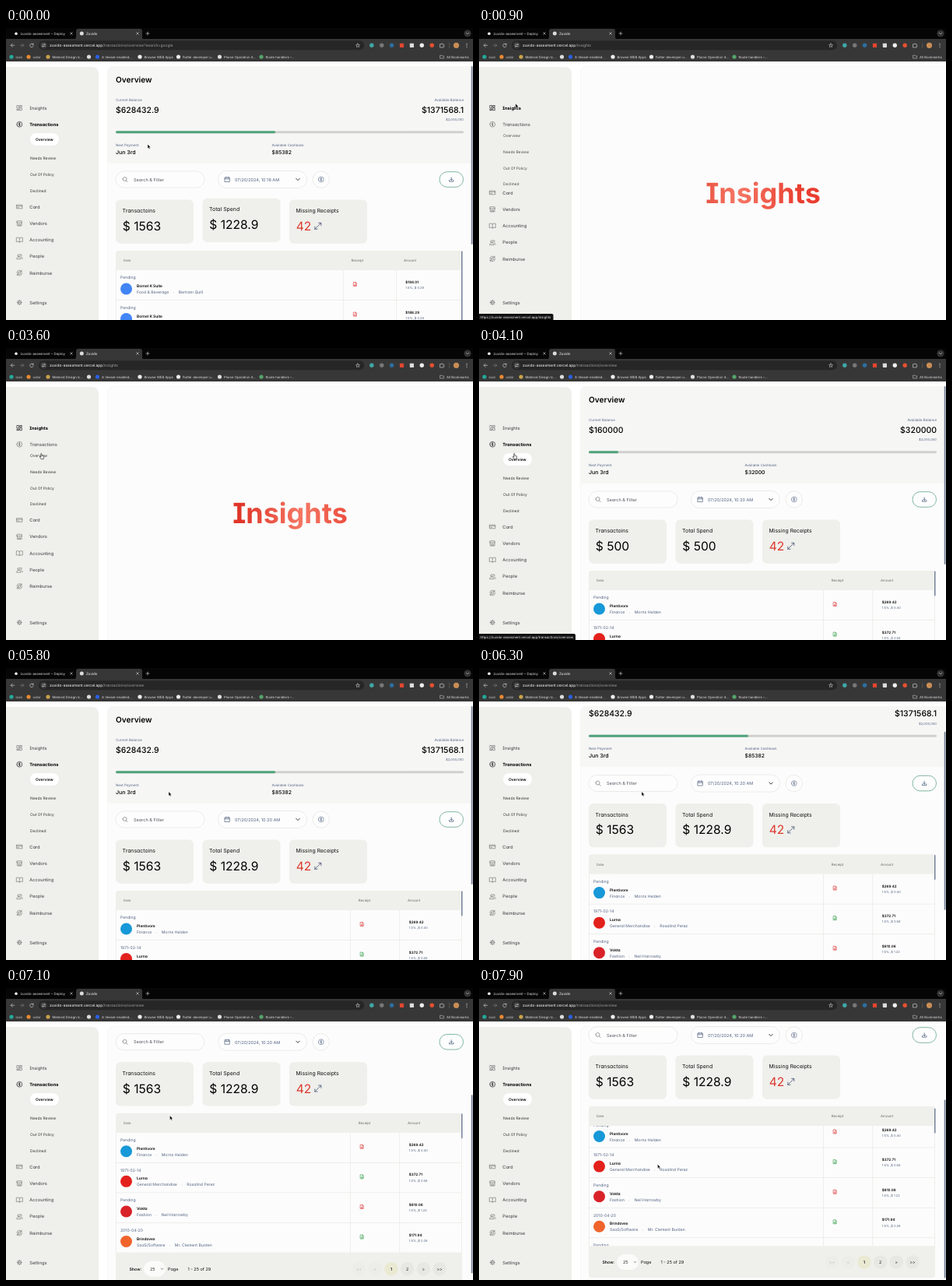
Recreate the animation shown at these times as an HTML page. Size 600 by 375 pixels, loop 8000 ms.

```html
<!DOCTYPE html>
<html lang="en">
<head>
<meta charset="utf-8">
<title>Overview</title>
<style>
  html, body { margin: 0; width: 100%; height: 100%; overflow: hidden; background: #fff; }
  svg { display: block; width: 100vw; height: 100vh; font-family: Inter, sans-serif; text-rendering: geometricPrecision; }
  .page { font-feature-settings: "cv08", "cv11"; }
</style>
</head>
<body>
<svg id="stage" viewBox="0 0 600 375"></svg>
<script>
const LOOP = 8000;
const OPEN_INSIGHTS = 850, OPEN_OVERVIEW = 3950;
const HOST = 'zuvido-assesment.vercel.app';
const INK = '#111', SLATE = '#536482', SAND = '#efefeb', LINE = '#e4e4e0';

const mix = (a, b, p) => a + (b - a) * p;
const progress = (t, from, to) => {
  const p = Math.min(1, Math.max(0, (t - from) / (to - from)));
  return p * p * (3 - 2 * p);
};
// keys: [time, value, value...]
function track(t, keys) {
  let i = 0;
  while (i < keys.length - 2 && t >= keys[i + 1][0]) i++;
  const [a, b] = [keys[i], keys[i + 1]];
  const p = progress(t, a[0], b[0]);
  return a.slice(1).map((v, k) => mix(v, b[k + 1], p));
}

// Text is placed by the middle of its capitals.
const text = (x, y, size, str, fill = INK, weight = 400, anchor = 'start') =>
  `<text x="${x}" y="${y + size * 0.36}" font-size="${size}" fill="${fill}" font-weight="${weight}" text-anchor="${anchor}">${str}</text>`;
const box = (x, y, w, h, fill, r = 0, stroke = 'none', sw = 0.6) =>
  `<rect x="${x}" y="${y}" width="${w}" height="${h}" rx="${r}" fill="${fill}" stroke="${stroke}" stroke-width="${sw}"/>`;
const dot = (x, y, r, fill, stroke = 'none', sw = 0.6) =>
  `<circle cx="${x}" cy="${y}" r="${r}" fill="${fill}" stroke="${stroke}" stroke-width="${sw}"/>`;
const icon = (x, y, d, stroke, sw = 0.6, fill = 'none') =>
  `<path transform="translate(${x} ${y})" d="${d}" fill="${fill}" stroke="${stroke}" stroke-width="${sw}" stroke-linecap="round" stroke-linejoin="round"/>`;
const group = (inner, dy = 0, extra = '') => `<g transform="translate(0 ${dy})" ${extra}>${inner}</g>`;

const COIN = 'M-3.4 0a3.4 3.4 0 1 0 6.8 0a3.4 3.4 0 1 0-6.8 0M1-1C.6-1.8-1-1.7-1-.8S1 0 1 .8S-.7 1.7-1 1M0-2v4';
const CROSS = 'M-1.3-1.3l2.6 2.6M1.3-1.3l-2.6 2.6';
const CHEVRON = 'M-1.8-.9L0 .9L1.8-.9';
const FOLDER = 'M-2.3-1.8h1.8l.7.7h2.1v3h-4.6z';
const MENU = {
  Insights: 'M-3-3h2.3v3.4H-3zM.8-3H3v1.8H.8zM-3 1.8h2.3V3.2H-3zM.8.2H3v3H.8z',
  Transactions: COIN,
  Card: 'M-3.5-2.3h7v4.6h-7zM-3.5-.8h7M-2.3 1h1.4',
  Vendors: 'M-2.8-3h5.6l.5 2.2h-6.6zM-2.8-.8v4h5.6v-4M-1 3.2V1h2v2.2',
  Accounting: 'M0-2.2C-1-3-2.5-3-4-2.7v5.2c1.5-.3 3-.2 4 .5c1-.7 2.5-.8 4-.5v-5.2C2.5-3 1-3 0-2.2v5.2',
  People: 'M-2.3-1a1.5 1.5 0 1 0 3 0a1.5 1.5 0 1 0-3 0M-3.6 3c0-3.2 5.6-3.2 5.6 0zM1.2-2.6a1.3 1.3 0 0 1 .8 2.5M2.6.9c1 .4 1.3 1.2 1.3 2.1',
  Reimburse: 'M-3.3 0a3.3 3.3 0 0 1 6-1.9M3.3 0a3.3 3.3 0 0 1-6 1.9M2.9-3.3v1.6H1.3M-2.9 3.3V1.7h1.6M-1.5 0a1.5 1.5 0 1 0 3 0a1.5 1.5 0 1 0-3 0',
  Settings: 'M-2.2 0a2.2 2.2 0 1 0 4.4 0a2.2 2.2 0 1 0-4.4 0M-.7 0a.7.7 0 1 0 1.4 0a.7.7 0 1 0-1.4 0M0-3.3v1M0 2.3v1M-3.3 0h1M2.3 0h1M-2.3-2.3l.7.7M1.6 1.6l.7.7M2.3-2.3l-.7.7M-1.6 1.6l-.7.7'
};

const RED = '#e14b4b', GREEN = '#47a75a';
const SEARCHED = {
  receiptX: 433.5, amountX: 501, textGap: 10, thumb: 130, time: '10:18',
  rows: [
    ['Pending', 'Bornel K Suite', '#4285f4', 'Food &amp; Beverage', 'Bertram Quill', '194.01', '0.29', RED],
    ['Pending', 'Bornel K Suite', '#4285f4', 'Food &amp; Beverage', 'Bertram Quill', '188.29', '0.28', RED]
  ]
};
const COMPLETE = {
  receiptX: 442.3, amountX: 505.5, textGap: 10.5, thumb: 32, time: '10:20',
  rows: [
    ['Pending', 'Plentivore', '#1798d8', 'Finance', 'Morris Helden', '269.42', '0.40', RED],
    ['1971-02-14', 'Lurna', '#e3211c', 'General Merchandise', 'Rosalind Perez', '372.71', '0.56', GREEN],
    ['Pending', 'Vokta', '#d92228', 'Fashion', 'Neil Harrowby', '810.06', '1.22', RED],
    ['2010-04-20', 'Brindovex', '#f0642c', 'SaaS/Software', 'Mr. Clement Burden', '171.94', '0.26', GREEN],
    ['Pending', 'Quillmer', '#4b79c4', 'Travel', 'Edwin Marlow', '240.18', '0.36', RED]
  ]
};

function browser(path) {
  const pale = '#dedede', grey = '#a0a0a0';
  let s = box(0, 0, 600, 14.5, '#060606') + box(0, 14, 600, 29, '#373737') +
    `<path d="M87 14.5q3 0 3-3V4q0-3 3-3h79q3 0 3 3v7.500q0 3 3 3z" fill="#373737"/>` +
    dot(13, 7.3, 1.8, '#fff') + text(18.5, 7, 4.4, 'zuvido-assesment – Deploy', pale) + icon(84, 7, CROSS, pale) +
    dot(97.3, 7, 2.5, '#ddd') + text(103, 7, 4.5, 'Zuvido', '#fff') + icon(169, 7, CROSS, pale) +
    icon(182, 7, 'M-2 0h4M0-2v4', pale) + dot(593, 7, 4.6, '#333') + icon(593, 7, CHEVRON, pale);
  s += icon(8.5, 22.3, 'M2.300 0h-4.600M-.2-2.100L-2.300 0L-.2 2.100', pale) +
    icon(20.5, 22.3, 'M-2.300 0h4.600M.2-2.100L2.300 0L.2 2.100', '#858585') +
    icon(33, 22.3, 'M1.900-1.200A2.300 2.300 0 1 0 2.200.7M2.100-2.500v1.500H.6', pale) +
    box(42, 16.3, 418, 12, '#262626', 6) + dot(48.500, 22.3, 4.300, '#3c3c3c') +
    icon(48.5, 22.3, 'M-2-1.200H.5M2-1.200H1.800M-2 1.200h.3M-.4 1.200H2M.6-1.200a.6.6 0 1 0 1.200 0a.6.6 0 1 0-1.200 0M-1.700 1.200a.6.6 0 1 0 1.200 0a.6.6 0 1 0-1.200 0', pale, 0.5) +
    text(56, 22.300, 4.9, `${HOST}<tspan fill="${grey}">${path}</tspan>`, '#fff') +
    icon(452, 22.3, 'M0-2.500L.7-.8L2.500-.7L1.100.5L1.600 2.300L0 1.300L-1.600 2.300L-1.100.5L-2.500-.7L-.7-.8z', pale, 0.5);
  ['#3fa9a5', '#777', '#2c6fa0', '#e2452f', '#ddd', '#eee', '#e8502f'].forEach((color, i) => {
    const x = 469.8 + i * 12.9;
    s += i === 3 || i === 4 ? box(x - 2.6, 19.700, 5.2, 5.2, color, 0.6) : dot(x, 22.3, 2.7, color);
  });
  s += icon(560, 22.3, 'M-2.200-1.500h1.400a.8.8 0 1 1 1.600 0h1.400v1.300a.8.8 0 1 1 0 1.600v1.200h-4.400z', pale) +
    box(569.5, 19, 0.6, 7, '#666') + dot(578.5, 22.3, 3.6, '#c98d55') +
    [-1.9, 0, 1.9].map(d => dot(592, 22.3 + d, 0.55, pale)).join('');
  [
    [7, '#25a99a', 'icon'], [29, '#e98a31', 'color'], [54, '#c9a24a', 'Material Design Ic...'], [106.500, '#ddd', ''],
    [117.500, '#2a62e0', 'A Vessel-enabled...'], [172, '#eee', 'Browse WEB Apps'], [221.500, '#eee', 'flutter developer u...'],
    [274.500, '#ddd', 'Plume Operation A...'], [328, '#55a56a', 'Route handlers –...']
  ].forEach(([x, color, label]) => { s += dot(x, 37, 2.600, color) + text(x + 5.500, 37, 4.25, label, pale); });
  return s + icon(560.3, 37, FOLDER, pale, 0.5) + text(566, 37, 4.25, 'All Bookmarks', pale);
}

function sidebar(onOverview, open) {
  const active = onOverview ? 'Transactions' : 'Insights';
  const shift = onOverview ? 84.5 : 76 * open;
  let s = `<path d="M0 50H110q9 0 9 9V375H0z" fill="${SAND}"/>`;
  Object.keys(MENU).forEach((name, i) => {
    const y = name === 'Settings' ? 352.500 : 102.500 + 21.25 * i + (i > 1 ? shift : 0);
    const on = name === active;
    s += icon(17.300, y, MENU[name], on ? '#111' : '#4c4c4c', on ? 0.65 : 0.5) +
      text(30.3, y, 5.75, name, on ? '#000' : '#3b3b40', on ? 700 : 400);
  });
  if (onOverview) s += box(31, 135, 37, 16, '#fff', 8);
  if (open > 0) {
    const sub = ['Overview', 'Needs Review', 'Out Of Policy', 'Declined'].map((name, i) => {
      const picked = onOverview && i === 0;
      const y = 138.500 + 20.65 * i + (onOverview ? (i ? 8.500 : 4.500) : 0);
      return text(picked ? 38 : 31, y, 4.95, name, picked ? '#000' : '#333', picked ? 600 : 400);
    }).join('');
    s += `<clipPath id="fold"><rect x="0" y="130" width="119" height="${2 + 86 * open}"/></clipPath><g clip-path="url(#fold)" opacity="${open}">${sub}</g>`;
  }
  return s;
}

function insights(t) {
  const glow = 345 + (t - 1900) * 0.018;
  return `<linearGradient id="coral" gradientUnits="userSpaceOnUse" x1="${glow - 75}" y1="0" x2="${glow + 85}" y2="0">
    <stop offset="0" stop-color="#df3528"/><stop offset=".5" stop-color="#f57764"/><stop offset="1" stop-color="#e93e30"/></linearGradient>` +
    text(365, 212, 36, 'Insights', 'url(#coral)', 700, 'middle');
}

function table(view, inner) {
  const { receiptX, amountX, textGap, rows } = view;
  let body = '';
  rows.forEach(([date, name, color, kind, person, amount, fee, receipt], i) => {
    const y = 311 + 38.6 * i - inner;
    body += text(147, y + 9.5, 5.1, date, SLATE) + dot(154.5, y + 24, 7.5, color) +
      text(168, y + 20.3, 4.85, name, '#000', 600) +
      text(168, y + 28.3, 5.1, `${kind}<tspan dx="5" font-size="3.5" fill="#c3c8d0">•</tspan><tspan dx="5.5">${person}</tspan>`, SLATE) +
      icon(receiptX + 15, y + 18, 'M-1.800-2.500H.7L1.900-1.300V2.500H-1.800zM.6-2.400v1.200h1.200M-.8 1.300L0-.3L.9 1.300z', receipt, 0.7) +
      text(amountX + 12.3, y + 15.5, 4.55, '$' + amount, '#000', 600) +
      text(amountX + 12.3, y + 22.8, 4.05, `1.5% ,$ ${fee}`, SLATE) +
      box(141, y + 38.2, 444, 0.6, LINE);
  });
  const rule = x => box(x, 310, 0.6, 156, LINE);
  return `<clipPath id="rows"><rect x="141" y="310" width="446" height="155.500"/></clipPath>
    <g clip-path="url(#rows)">${body}</g>` + [141, receiptX, amountX, 585].map(rule).join('') +
    `<path d="M141 311V290q0-4 4-4H585V311z" fill="${SAND}"/>` +
    text(151, 298.500, 4.2, 'Date', '#666') + text(receiptX + textGap, 298.5, 4.4, 'Receipt', '#666') +
    text(amountX + textGap, 298.5, 4.4, 'Amount', '#666') +
    box(585, 286.5 + inner * 0.18, 1.5, view.thumb, '#75819a', 0.7);
}

function pager() {
  const y = 486;
  let s = `<path d="M141 465.300H586V502q0 4-4 4H145q-4 0-4-4z" fill="${SAND}"/>` +
    text(158.5, y, 5.2, 'Show:', INK, 600) + box(177, y - 10, 28, 20, '#fbfbfa', 10) + text(185, y, 5.5, '25', '#333') +
    icon(200.5, y, 'M-1.400-.7L0 .7L1.400-.7', '#444') +
    text(208, y, 5.5, 'Page', '#111') + text(233.5, y, 5.5, '1 - 25 of 29', '#111');
  ['&lt;&lt;', '&lt;', '1', '2', '&gt;', '&gt;&gt;'].forEach((label, i) => {
    const x = 453.5 + 20.7 * i;
    s += dot(x, y, 8.7, i === 2 ? '#eaead3' : i < 2 ? '#ecece8' : '#e7e7e3') +
      text(x, y, 5.4, label, i < 2 ? '#bbb' : '#222', i === 2 ? 600 : 400, 'middle');
  });
  return s;
}

function overview(t, view, scroll, inner) {
  const p = view === SEARCHED ? 1 : progress(t, 4130, 4680);
  const count = (from, to) => Number(mix(from, to, p).toFixed(to % 1 ? 1 : 0));
  let s = box(130, 49, 480, 124.500, '#f6f6f5') + text(141, 66.800, 10.1, 'Overview', '#000', 600) +
    text(141, 92.5, 4.4, 'Current Balance', SLATE) + text(588, 92.5, 4.45, 'Available Balance', SLATE, 400, 'end') +
    text(141, 105, 10.4, '$' + count(160000, 628432.9), '#000', 500) +
    text(588, 105, 10.5, '$' + count(320000, 1371568.1), '#000', 500, 'end') +
    text(588, 117.5, 4.15, '$2,000,000', SLATE, 400, 'end') +
    box(141, 132.2, 447, 3, '#d0d0ce', 1.5) + box(141, 132.2, mix(38, 205, p), 3, '#50a47b', 1.5) +
    text(141, 150, 4.45, 'Next Payment', SLATE) + text(141, 159.2, 7, 'Jun 3rd', '#000', 500) +
    text(341.500, 150, 4.4, 'Available Cashback', SLATE) + text(341.5, 159.2, 6.800, '$' + count(32000, 85382), '#000', 500);

  s += box(141, 184, 114, 21, '#fdfdfd', 10.5, '#e0e0dc') +
    icon(153, 194.5, 'M-3-.5a2.500 2.500 0 1 0 5 0a2.500 2.500 0 1 0-5 0M1.300 1.300L3.200 3.200', '#666') +
    text(164, 194.5, 5.6, 'Search &amp; Filter', '#55565f') +
    box(272.5, 183.5, 114, 22, '#fdfdfd', 11, '#e0e0dc') +
    icon(284.3, 194.5, 'M-3-2.500h6v5.500h-6zM-3-.7h6M-1.500-3.400v1.600M1.500-3.400v1.600', SLATE, 0.7) +
    text(294, 194.8, 5.5, `07/20/2024, ${view.time} AM`, SLATE) +
    icon(375, 194.5, 'M-2.200-1.100L0 1.100L2.200-1.100', '#222', 0.9) +
    dot(404.800, 194.5, 10.7, '#fdfdfd', '#e0e0dc') + icon(404.8, 194.5, COIN, SLATE) +
    box(557, 184.7, 30.5, 19.6, '#fdfdfd', 9.8, '#64a58a', 0.8) +
    icon(572.2, 194.5, 'M0-2.600V1M-1.500-.4L0 1.100L1.500-.4M-2.700 1v1.600h5.400V1', '#34506e', 0.7);

  const lift = view === SEARCHED ? -1.7 * (1 - progress(t, 0, 150)) : 0;
  [
    ['Transactoins', '$ ' + count(500, 1563)], ['Total Spend', '$ ' + count(500, 1228.9)], ['Missing Receipts', '42']
  ].forEach(([label, value], i) => {
    const x = 141 + 111.5 * i;
    s += group(box(x, 220.500, 100, 56.3, SAND, 6) + text(x + 8.6, 234.6, 6.9, label) +
      text(x + 8.8, 254.2, 15.6, value, i === 2 ? '#dd392e' : '#000'), i === 1 ? lift : 0);
  });
  s += icon(400.8, 254.3, 'M-4 4L4-4M.8-4H4V-.8M-4 .8V4H-.8', SLATE, 0.9);
  s += table(view, inner) + pager();
  return group(s, -scroll) + box(597.7, 49 + scroll * 0.705, 1.8, 229, '#737f95', 0.9);
}

function pointer(t) {
  const [x, y] = track(t, [
    [0, 182, 149.5], [750, 47, 98], [1300, 46.5, 94], [2100, 46.5, 94], [2700, 47, 122],
    [3100, 47, 122], [3450, 46, 139], [4800, 46, 139], [5750, 209, 159],
    [7000, 209, 159], [7600, 229.5, 226.5], [LOOP, 229.5, 226.5]
  ]);
  return t > 2500 && t < 4950
    ? icon(x, y, 'M-1.300-3c0-.9 1.200-.9 1.200 0V-.8l2.100.5c.7.200.9.600.7 1.300L2.200 3.600H-1L-2.600.9c-.3-.7.5-1.100 1-.4l.3.400z', '#111', 0.6, '#fff')
    : icon(x, y, 'M0 0v5.200l1.200-1.100l.9 1.900l.9-.4l-.9-1.900h1.600z', '#fff', 0.35, '#000');
}

function status(t) {
  const show = (width, path) => box(-3, 367, width + 3, 11, '#111', 2) + text(1.500, 371.2, 4.25, `https://${HOST}${path}`, '#f4f4f4');
  if (t > 700 && t < 2350) return show(95.5, '/insights');
  if (t > 3680 && t < 5050) return show(124, '/transactions/overview');
  return '';
}

function scene(t) {
  const onInsights = t >= OPEN_INSIGHTS && t < OPEN_OVERVIEW;
  const view = t < OPEN_INSIGHTS ? SEARCHED : COMPLETE;
  const open = t < 2900 ? 1 - progress(t, OPEN_INSIGHTS, 1080) : progress(t, 3000, 3250);
  const [scroll] = track(t, [[0, 0], [5980, 0], [6680, 106], [6850, 106], [7250, 134], [LOOP, 134]]);
  const inner = 10.5 * progress(t, 7600, 7900);
  const path = onInsights ? '/insights' : '/transactions/overview' + (view === SEARCHED ? '?search=google' : '');
  const main = onInsights ? insights(t) : overview(t, view, scroll, inner);
  return box(0, 0, 600, 375, '#fff') +
    `<clipPath id="panel"><rect x="130" y="49" width="490" height="340" rx="8"/></clipPath>
     <g class="page">${sidebar(!onInsights, open)}${box(130.300, 49.300, 480, 340, '#fcfcfc', 8, '#f0f0ee')}
     <g clip-path="url(#panel)">${main}</g></g>` +
    browser(path) + status(t) + pointer(t);
}

const stage = document.getElementById('stage');
function frame() {
  stage.innerHTML = scene(performance.now() % LOOP);
  requestAnimationFrame(frame);
}
frame();
</script>
</body>
</html>
```
